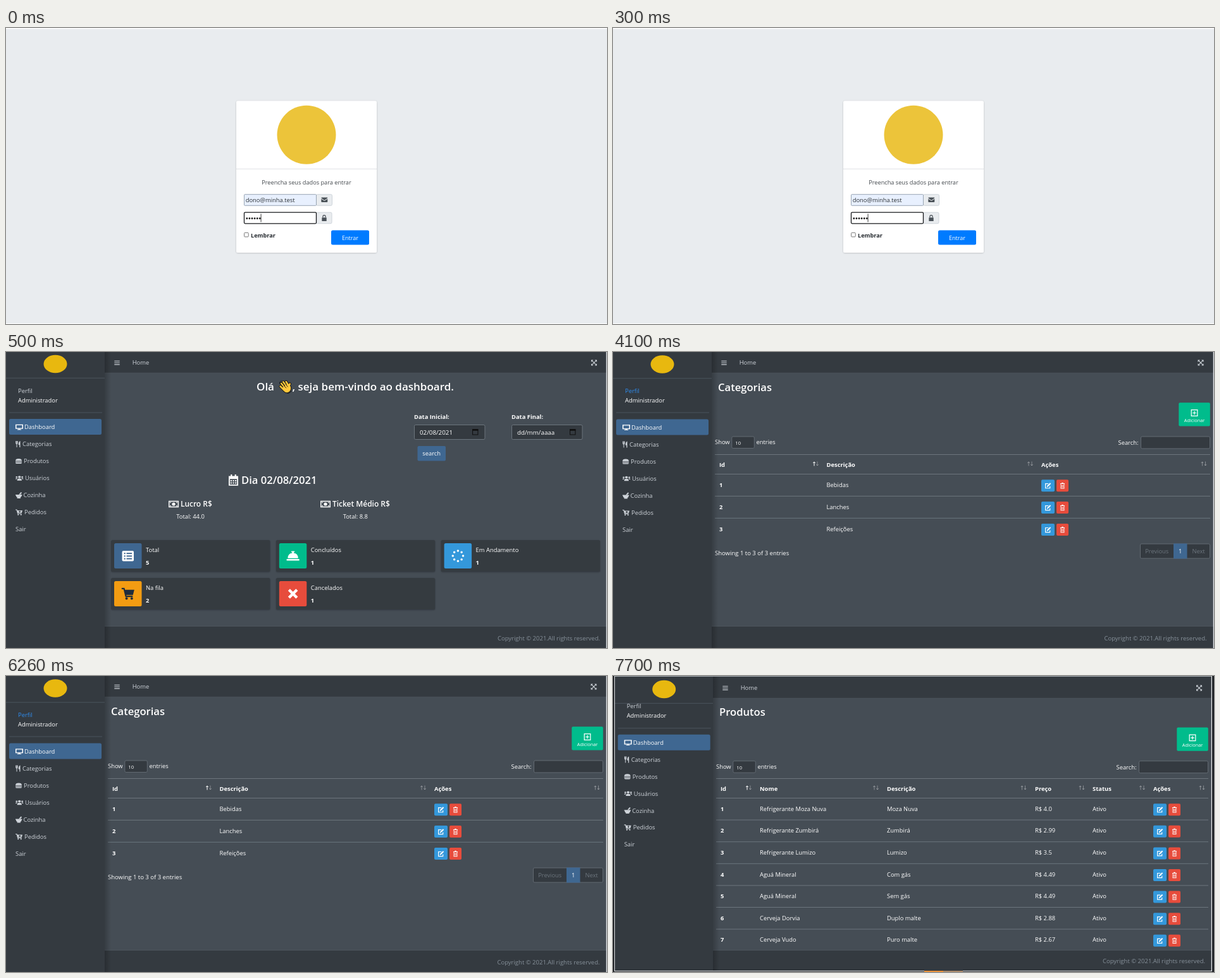
An HTML page that plays this animation: 950x469 px, repeating every 8000 ms.

```html
<!DOCTYPE html>
<html lang="pt">
<head>
<meta charset="utf-8">
<title>Painel</title>
<style>
  html, body { margin: 0; width: 100%; height: 100%; overflow: hidden; background: #454d55; }
  svg { display: block; width: 100vw; height: 100vh; }
  text { font-family: "Open Sans", "Noto Sans", sans-serif; white-space: pre; }
</style>
</head>
<body>
<svg id="stage" viewBox="0 0 950 469" preserveAspectRatio="none"></svg>
<script>
const DARK = '#343a40', MAIN = '#454d55', LINE = '#6c757d', EDGE = '#4b545c';
const NAVY = '#3f6791', BLUE = '#3498db', RED = '#e74c3c', GREEN = '#00bc8c';
const PALE = '#ced3d9', WHITE = '#fff';

// Icons on a 16 x 16 grid: [filled path, stroked path, stroke width]
const dot = (x, y, r) => `M${x - r} ${y}a${r} ${r} 0 1 0 ${2 * r} 0a${r} ${r} 0 1 0 ${-2 * r} 0z`;
const CART = ['M3.5 3H16l-1.7 6.5H5.2z' + dot(6.2, 14, 1.6) + dot(12.8, 14, 1.6), 'M0 1.5h3l2.4 9.8h8.6', 1.7];
const ICONS = {
  bars: ['', 'M0.5 3h15M0.5 8h15M0.5 13h15', 2],
  expand: ['M0 0h6l-6 6zM16 0v6l-6-6zM0 16v-6l6 6zM16 16h-6l6-6z', 'M3 3l10 10M13 3L3 13', 2],
  desktop: ['M6.5 12.5h3l.6 1h2V15H3.9v-1.5h2z', 'M1 2h14v9.5H1z', 2],
  utensils: ['M15 0v16h-2.5v-6h-3Q9 2 15 0z', 'M1.5 0v5q0 2 2.5 2t2.5-2V0M4 0v16', 2],
  burger: ['M0 7q0-5.5 8-5.5t8 5.5zM0 8.2h16v2H0zM0 11.5h16q0 3-3 3H3q-3 0-3-3z', '', 0],
  users: [dot(8, 4.8, 2.9) + dot(2.3, 5, 1.9) + dot(13.7, 5, 1.9) +
    'M3.3 14q0-5.500 4.700-5.500t4.700 5.500zM0 10.500q0-3 2.500-3l1.500 1q-1.500 1-1.500 2zM16 10.500q0-3-2.500-3l-1.500 1q1.500 1 1.500 2z', '', 0],
  mortar: ['M0 6.500h16v2h-1q0 4-3.500 5.500l1 2h-9l1-2Q1 12.500 1 8.500H0zM8 6l5-6 2.500 1.500-3.500 4.500z', '', 0],
  cart: CART,
  cartPlus: [CART[0] + 'M9 3.800h1.600v1.700h1.700V7h-1.700v1.700H9V7H7.300V5.500H9z', CART[1], CART[2]],
  calendar: ['M1 3h14v3.500H1zM4 0h2v3H4zM10 0h2v3h-2z' +
    [8, 11].map(y => [3.6, 7, 10.4].map(x => `M${x} ${y}h2v1.800h-2z`).join('')).join(''), 'M1.8 3h12.4v12H1.8z', 1.7],
  picker: ['M1 1h14v4H1z', 'M1.6 2h12.8v12.5H1.6z', 1.6],
  money: [dot(8, 8, 2.6) + dot(3, 5.3, 0.9) + dot(13, 5.3, 0.9) + dot(3, 10.7, 0.9) + dot(13, 10.7, 0.9),
    'M.7 3.500h14.600v9H.7z', 1.4],
  bell: ['M1.500 11q0-6 5.500-6.700V3.300H6V2h4v1.300H9v1q5.500.7 5.500 6.700zM0 12h16v2H0z', '', 0],
  spinner: [Array.from({ length: 8 }, (_, i) =>
    dot(8 + 6.5 * Math.cos(i * Math.PI / 4), 8 + 6.5 * Math.sin(i * Math.PI / 4), 1.4)).join(''), '', 0],
  cross: ['', 'M3 3l10 10M13 3L3 13', 3.6],
  edit: ['M5.500 8.500L13 1l2.300 2.300-7.500 7.500-3 .7z', 'M9 3.200H1.500v11.300h11.300V9.500', 1.9],
  trash: ['M5.500 0h5v2h-5z', 'M1 2.700h14M2.800 3.500v11.600h10.400V3.500M6.200 6v6.500M9.800 6v6.500', 1.7],
  plus: ['', 'M1 1h14v14H1zM8 4v8M4 8h8', 1.8],
  envelope: ['M0 3.500Q0 2 1.500 2h13Q16 2 16 3.500L8 9zM0 5.500l8 5.300 8-5.300v7q0 1.500-1.500 1.500h-13Q0 14 0 12.500z', '', 0],
  lock: ['M1 7h14v9H1z', 'M4 7V4.500q0-3.500 4-3.500t4 3.500V7', 2.2]
};

const rect = (x, y, w, h, fill, rx = 0, more = '') =>
  `<rect x="${x}" y="${y}" width="${w}" height="${h}" fill="${fill}" rx="${rx}" ${more}/>`;
const box = (x, y, w, h, fill, stroke, rx = 2, sw = 1) =>
  rect(x, y, w, h, fill, rx, `stroke="${stroke}" stroke-width="${sw}"`);
const hline = (x, y, w, color = LINE) => rect(x, y, w, 1, color);
const text = (x, y, str, { size = 9.4, fill = WHITE, weight = 400, anchor = 'start' } = {}) =>
  `<text x="${x}" y="${y}" font-size="${size}" fill="${fill}" font-weight="${weight}" text-anchor="${anchor}">${str}</text>`;
const bold = (x, y, str, more) => text(x, y, str, { weight: 700, ...more });
const head = (x, y, str, size = 16.6) => text(x, y, str, { size, weight: 600 });
const mid = (x, y, str, more) => text(x, y, str, { anchor: 'middle', ...more });
const icon = (name, x, y, w, h = w, color = WHITE) => {
  const [fill, line, sw] = ICONS[name];
  return `<g transform="translate(${x} ${y}) scale(${w / 16} ${h / 16})">` +
    `<path d="${fill}" fill="${color}" fill-rule="evenodd"/><path d="${line}" fill="none" stroke="${color}" stroke-width="${sw}"/></g>`;
};

function login() {
  const grey = '#495057';
  let s = rect(0, 0, 950, 469, '#e9ecef') + rect(0, 0, 950, 1.5, WHITE) + rect(0, 468, 950, 1, WHITE);
  s += rect(364, 115.5, 222, 240.5, WHITE, 2.5, 'filter="url(#soft)"');
  s += '<circle cx="475" cy="169.3" r="46.5" fill="#ecc43a"/>' + hline(364, 222.8, 222, '#dfe2e5');
  s += mid(475, 247.7, 'Preencha seus dados para entrar', { size: 9.2, fill: '#43484d' });
  s += box(490.5, 263.7, 25, 17.6, '#e9ecef', '#ced4da') + box(490.5, 292.2, 24.5, 17.6, '#e9ecef', '#ced4da');
  s += box(376.5, 263.7, 114, 17.6, '#e8f0fe', '#98a4b3', 1) + box(376.5, 292.2, 114, 17.6, WHITE, '#16181b', 1.5, 1.3);
  s += text(378.7, 276.4, 'dono@minha.test', { fill: '#2b3035' });
  for (let i = 0; i < 6; i++) s += `<circle cx="${380.8 + i * 4.1}" cy="301.7" r="1.45" fill="#222"/>`;
  s += rect(402.6, 294.5, 0.9, 13, '#222');
  s += icon('envelope', 498.3, 267.3, 10, 10, grey) + icon('lock', 498.8, 296, 8.4, 10, grey);
  s += box(376.6, 324.3, 6.6, 6.6, WHITE, '#777', 1) + bold(387, 331.7, 'Lembrar', { size: 9.1, fill: '#24292e' });
  return s + rect(514, 320.5, 60, 23, '#007bff', 2.5) + mid(544, 335.7, 'Entrar', { size: 9.1 });
}

const MENU = [
  ['Dashboard', 'desktop', 12, 29], ['Categorias', 'utensils', 8, 26], ['Produtos', 'burger', 10, 28],
  ['Usuários', 'users', 12.5, 30], ['Cozinha', 'mortar', 10.5, 27.5], ['Pedidos', 'cartPlus', 11, 29], ['Sair', '', 0, 15]
];

// Side menu, top bar and footer shared by the panel pages
function shell(body, { dx = 0, dy = 0, profile = 64.5, active = 106, step = 27, link = PALE, side = 156,
  top = 33.5, right = 939, foot = 456.5 } = {}) {
  const bar = top - 16.5, out = right - 14;
  let s = rect(0, 0, 950, 469, MAIN) + body;
  s += rect(side, 0, 950 - side, top, DARK) + hline(side, top - 0.7, 950 - side, EDGE);
  s += icon('bars', side + 15, bar - 4.5, 9, 9, PALE) + text(side + 43.7, bar + 3.4, 'Home', { fill: PALE });
  s += icon('expand', out, bar - 4.5, 9, 9, PALE);
  s += rect(side, 434, 950 - side, 35, DARK) + hline(side, 434, 950 - side, EDGE);
  s += text(right, foot, 'Copyright © 2021.All rights reserved.', { size: 9.5, fill: '#869099', anchor: 'end' });
  s += rect(side, 0, 10, 469, 'url(#shade)') + rect(0, 0, side, 469, DARK);
  s += `<ellipse cx="${78 + dx}" cy="${19 + dy}" rx="18.5" ry="14.3" fill="#e8b80f"/>`;
  s += hline(0, 40.8 + dy, side, EDGE);
  s += text(19 + dx, profile, 'Perfil', { fill: link }) + text(19 + dx, profile + 15, 'Administrador');
  s += hline(5 + dx, profile + 31, 147, EDGE) + rect(5 + dx, active, 146, 25, NAVY, 2.5);
  MENU.forEach(([label, name, w, x], i) => {
    const y = active + 13 + i * step, fill = i ? PALE : WHITE;
    if (name) s += icon(name, 15 + dx, y - 5, w, 10, fill);
    s += text(x + dx, y + 3.4, label, { fill });
  });
  return s;
}

// Waving hand: dark outline below, yellow on top
function hand() {
  const lines = 'M436 50l7 8M439 47.5l7 9M443.5 47l5 8M434.5 54.5l6 6M449.5 50.5q-2 3 0 6';
  const palm = 'M438 57l8-6 4 4q1.500 5-2 7.500-4 2.500-7-.5z';
  const layer = (c, w) => `<path d="${lines}" stroke="${c}" stroke-width="${w}" fill="none"/>` +
    `<path d="${palm}" fill="${c}" stroke="${c}" stroke-width="${w - 1.4}"/>`;
  return `<g transform="translate(-0.8 0)" stroke-linecap="round" stroke-linejoin="round">${layer('#111', 4.4)}${layer('#ffc83d', 2.6)}` +
    '<path d="M440 53l3.500 4M443 51l3 4M433 49.500q.5-2.500 3-4M446 65.500q4 0 6-3.500" fill="none" stroke="#111" stroke-width=".9"/></g>';
}

function dateField(x, label, value) {
  return bold(x, 106.4, label) + box(x + 0.5, 115.5, 111.5, 23, DARK, LINE) +
    text(x + 9, 130.8, value, { size: 9.8 }) + icon('picker', x + 91.5, 121.5, 10.5, 10.5, '#111');
}

function dashboard() {
  let s = head(396, 61.3, 'Olá', 17) + hand() + head(452.5, 61.3, ', seja bem-vindo ao dashboard.', 17);
  s += dateField(645, 'Data Inicial:', '02/08/2021') + dateField(799, 'Data Final:', 'dd/mm/aaaa');
  s += rect(650.5, 149, 44.5, 23.5, NAVY, 2) + mid(672.7, 164, 'search');
  s += icon('calendar', 351, 194, 17, 18) + head(372, 209.3, 'Dia 02/08/2021');
  s += icon('money', 257, 233, 16) + head(276, 245, 'Lucro R$', 11.95) + mid(291.5, 264.4, 'Total: 44.0');
  s += icon('money', 497, 233, 16) + head(516, 245, 'Ticket Médio R$', 11.95) + mid(552.3, 264.4, 'Total: 8.8');
  const cards = [
    ['Total', 5, NAVY], ['Concluídos', 1, GREEN, 'bell'], ['Em Andamento', 1, BLUE, 'spinner'],
    ['Na fila', 2, '#f39c12', 'cart', '#1f2d3d'], ['Cancelados', 1, RED, 'cross']
  ];
  cards.forEach(([label, count, color, name, tint], i) => {
    const x = 166 + (i % 3) * 260.8, y = 298 + (i > 2 ? 60 : 0);
    s += rect(x, y, 251.5, 50.5, DARK, 2.5, 'filter="url(#soft)"') + rect(x + 5, y + 5, 43.5, 40, color, 2.5);
    if (name) s += icon(name, x + 16.8, y + 15, 20, 20, tint);
    else {
      s += rect(x + 17.5, y + 17, 18.5, 16.5, WHITE, 2);
      for (let k = 0; k < 3; k++)
        s += rect(x + 20.5, y + 20 + k * 4.2, 2.3, 2.3, color, 1) + rect(x + 24.5, y + 20.2 + k * 4.2, 8.5, 1.9, color);
    }
    s += text(x + 55, y + 18.5, label) + bold(x + 55, y + 38.8, count);
  });
  return s;
}

function sortMark(x, y, on) {
  const arrow = (d, o) => `<path d="${d}" fill="none" stroke="#fff" stroke-width="1" opacity="${o}"/>`;
  return arrow(`M${x + 2} ${y + 7}v-6.5m-1.8 2l1.8-2 1.8 2`, on ? 1 : 0.35) +
    arrow(`M${x + 7} ${y}v6.5m-1.8-2l1.8 2 1.8-2`, 0.35);
}

// cols: [heading, text x, sort mark x]; the last column holds the buttons
function table({ title, cols, rows, dx = 0, dy = 0, end, step }) {
  const x = 161 + dx, last = cols[cols.length - 1][1];
  let s = head(166 + dx, 62 + dy, title);
  s += rect(end - 49.7, 80.2 + dy, 49.5, 37.2, GREEN, 2) + icon('plus', end - 30.5, 91 + dy, 11);
  s += mid(end - 25, 110.6 + dy, 'Adicionar', { size: 7.4 });
  const y = 146 + dy * 0.5;
  s += text(x, y, 'Show') + box(x + 26.8, y - 12, 35.5, 18.5, DARK, '#626a72') + text(x + 32.3, y + 0.9, '10', { size: 7.6 });
  s += text(x + 65.5, y, 'entries') + text(end - 145.5, y + 1.2, 'Search:') + box(end - 109.5, y - 12, 109, 19, DARK, '#626a72');
  s += hline(x, 162, end - x) + hline(x, 193, end - x);
  cols.forEach(([label, cx, mark], i) => { s += bold(cx, 181.8, label) + sortMark(mark, 173.5, !i); });
  rows.forEach((row, i) => {
    const ry = 193 + i * step;
    if (i) s += hline(x, ry, end - x);
    s += bold(cols[0][1], ry + 20.7, i + 1);
    row.forEach((cell, k) => { s += text(cols[k + 1][1], ry + 20.7, cell); });
    s += rect(last, ry + 9.2, 21, 19, BLUE, 2) + icon('edit', last + 5.7, ry + 13.7, 10);
    s += rect(last + 24, ry + 9.2, 19, 19, RED, 2) + icon('trash', last + 29.5, ry + 14, 8, 9.5);
  });
  return s;
}

function categories() {
  const off = { fill: LINE, size: 9.3 };
  return table({
    title: 'Categorias', end: 944, step: 34.9,
    cols: [['Id', 168, 316], ['Descrição', 337.5, 655], ['Ações', 677, 929.5]],
    rows: [['Bebidas'], ['Lanches'], ['Refeições']]
  }) + text(161, 322, 'Showing 1 to 3 of 3 entries', { size: 9.5 }) +
    box(833.5, 304, 110, 23, DARK, '#626a72') + rect(886, 303.5, 21.5, 24, NAVY) +
    mid(859.7, 319.2, 'Previous', off) + mid(896.8, 319.2, '1') + mid(925.5, 319.2, 'Next', off);
}

function products() {
  const item = (name, note, price) => [name, note, 'R$ ' + price, 'Ativo'];
  const soda = (name, price) => item('Refrigerante ' + name, name, price);
  return table({
    title: 'Produtos', dx: 2, dy: 1.4, end: 941, step: 34.6,
    cols: [['Id', 170, 210], ['Nome', 232, 411], ['Descrição', 433, 644.5], ['Preço', 667, 736.5],
      ['Status', 758, 832], ['Ações', 854, 926.5]],
    rows: [soda('Moza Nuva', '4.0'), soda('Zumbirá', '2.99'), soda('Lumizo', '3.5'),
      item('Aguá Mineral', 'Com gás', '4.49'), item('Aguá Mineral', 'Sem gás', '4.49'),
      item('Cerveja Dorvia', 'Duplo malte', '2.88'), item('Cerveja Vudo', 'Puro malte', '2.67')]
  });
}

const rightEdge = rect(948.7, 0, 1.3, 469, '#dfe2e5');

// Light window outline with a dark margin outside it
const OUTER = '#1f2226', RIM = '#e4e6e8';
const frame = rect(0, 0, 2, 469, OUTER) + rect(947, 0, 3, 469, OUTER) + rect(0, 468, 950, 1, OUTER) +
  rect(2, 0, 1, 468, RIM) + rect(945.7, 0, 1.3, 468, RIM) + rect(2, 0, 945, 0.8, '#c9cdd1') + rect(2, 467, 945, 1, RIM) +
  rect(492, 467, 30, 2, '#e8923a') + rect(522, 467, 31, 2, '#a98a6c');

const scenes = [
  [0, login()],
  [500, shell(dashboard()) + rightEdge],
  [4100, shell(categories(), { dy: 0.5, active: 106.5, link: '#2f8df0', right: 938.5 }) + rightEdge],
  [7700, shell(products(), { dx: 2.7, dy: 2, profile: 51.2, active: 92.7, step: 26.85, side: 158,
    top: 35.5, right: 936, foot: 455.2 }) + frame]
];

const stage = document.getElementById('stage');
stage.innerHTML = `<defs>
  <filter id="soft" x="-10%" y="-10%" width="120%" height="125%"><feDropShadow dx="0" dy=".6" stdDeviation=".9" flood-opacity=".22"/></filter>
  <linearGradient id="shade"><stop stop-color="#000" stop-opacity=".22"/><stop offset="1" stop-color="#000" stop-opacity="0"/></linearGradient>
</defs>` + scenes.map(([, art]) => `<g>${art}</g>`).join('');
const groups = stage.querySelectorAll(':scope > g');

const LOOP = 8000, start = performance.now();
function draw(now) {
  const t = Math.max(0, now - start) % LOOP;
  const current = scenes.filter(([from]) => from <= t).length - 1;
  groups.forEach((g, i) => { g.style.display = i === current ? '' : 'none'; });
  requestAnimationFrame(draw);
}
draw(start);
</script>
</body>
</html>
```
